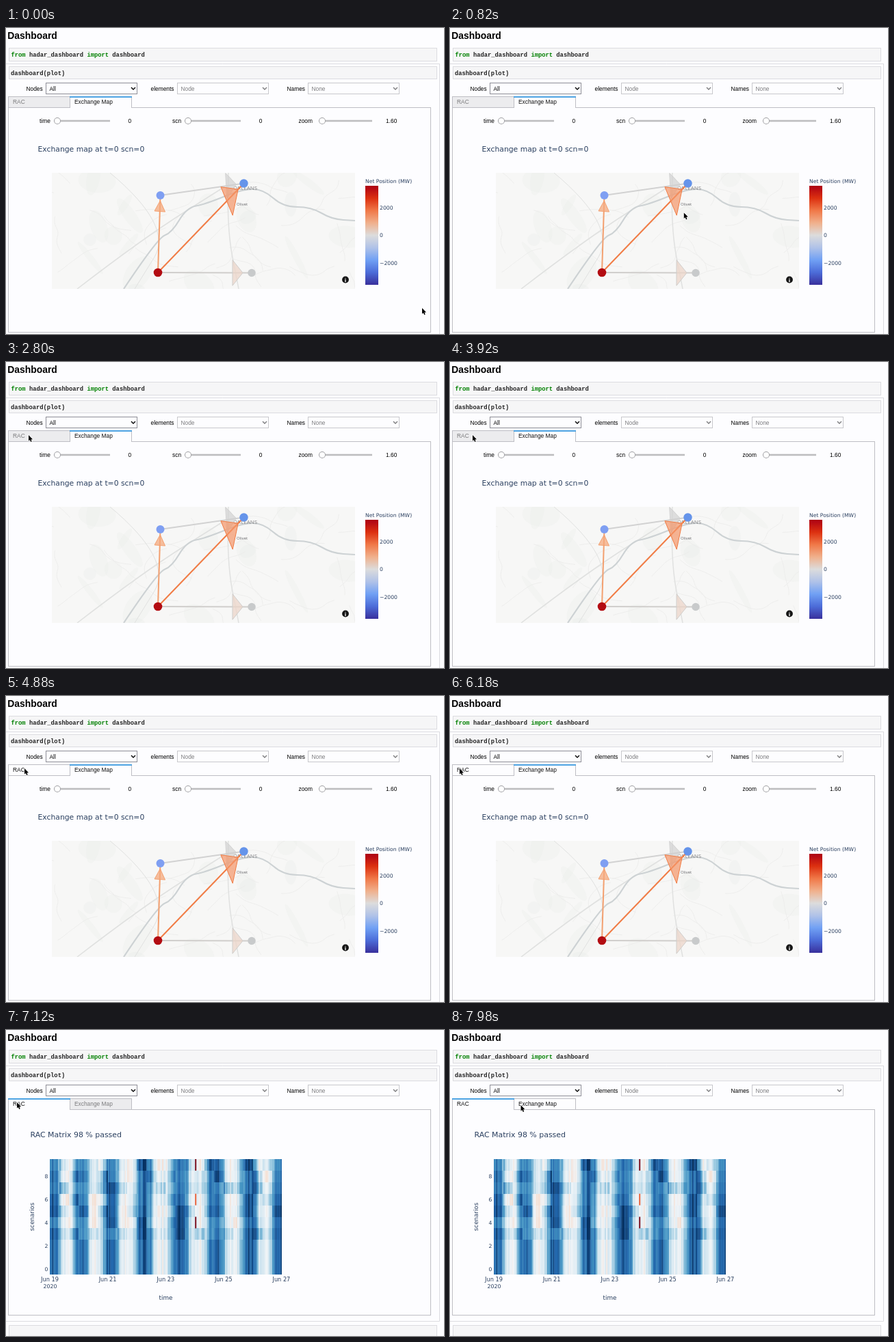
Write an HTML page with a canvas that moves like this. It is 640 by 448 pixels and loops after 8000 ms.

```html
<!DOCTYPE html>
<html lang="en">
<head>
<meta charset="utf-8">
<title>Dashboard</title>
<style>
html, body { margin: 0; width: 100%; height: 100%; overflow: hidden; background: #fdfdff; }
canvas { display: block; width: 640px; height: 448px; }
</style>
</head>
<body>
<canvas id="stage" width="640" height="448"></canvas>
<script>
const W = 640, H = 448, LOOP = 8000, SWITCH = 6400, HOVER = 4500;
const BG = '#fdfdff', PALE = '#f6f6f7', TAB = '#ececee', LINE = '#dcdce0', EDGE = '#bebec4';
const INK = '#000', GREY = '#7c7c7e', SOFT = '#2a3f5f';
const SANS = '"Liberation Sans", Arial, sans-serif';
const MONO = '"Liberation Mono", monospace';
const PLOT = '"DejaVu Sans", Verdana, sans-serif';
const stage = document.getElementById('stage').getContext('2d');

function rng(seed) {
  return () => {
    seed = (seed * 1664525 + 1013904223) >>> 0;
    return seed / 4294967296;
  };
}

function text(c, s, x, y, font, color = INK, align = 'left') {
  c.font = font;
  c.fillStyle = color;
  c.textAlign = align;
  c.fillText(s, x, y);
}
const label = (c, s, x, y, color) => text(c, s, x, y, '8.4px ' + SANS, color);
const plotText = (c, s, x, y, size, align) => text(c, s, x, y, size + 'px ' + PLOT, SOFT, align);

function box(c, x, y, w, h, fill, stroke) {
  c.fillStyle = fill;
  c.fillRect(x, y, w, h);
  c.strokeStyle = stroke;
  c.lineWidth = 1;
  c.strokeRect(x + 0.5, y + 0.5, w - 1, h - 1);
}

function path(c, pts, color, width) {
  c.beginPath();
  pts.forEach(([x, y]) => c.lineTo(x, y));
  c.strokeStyle = color;
  c.lineWidth = width;
  c.stroke();
}

// Smooth line through the midpoints of a few points.
function curve(c, pts, color, width) {
  c.beginPath();
  c.moveTo(...pts[0]);
  for (let i = 1; i < pts.length - 1; i++) {
    const [x, y] = pts[i], [nx, ny] = pts[i + 1];
    c.quadraticCurveTo(x, y, (x + nx) / 2, (y + ny) / 2);
  }
  c.lineTo(...pts[pts.length - 1]);
  c.strokeStyle = color;
  c.lineWidth = width;
  c.stroke();
}

function dot(c, x, y, r, color) {
  c.beginPath();
  c.arc(x, y, r, 0, 7);
  c.fillStyle = color;
  c.fill();
}

function layer(draw) {
  const cv = document.createElement('canvas');
  cv.width = W;
  cv.height = H;
  draw(cv.getContext('2d'));
  return cv;
}

function select(c, x, value, active) {
  const ink = active ? INK : GREY;
  box(c, x, 80, 134, 17, BG, active ? '#8e8e96' : '#c8c8cc');
  label(c, value, x + 5.5, 91.6, ink);
  path(c, [[x + 125, 87], [x + 128, 90], [x + 131, 87]], ink, 1.4);
}

function drawNotebook(c) {
  c.fillStyle = BG;
  c.fillRect(0, 0, W, H);
  text(c, 'Dashboard', 2.3, 16, 'bold 13.9px ' + SANS);
  const code = 'bold 8.8px ' + MONO, step = 5.28;
  box(c, 4, 29, 626, 20, PALE, LINE);
  let x = 7.5;
  for (const word of 'from hadar_dashboard import dashboard'.split(' ')) {
    const key = word === 'from' || word === 'import';
    text(c, word, x, 42, code, key ? '#008000' : '#222');
    x += (word.length + 1) * step;
  }
  box(c, 4, 56, 626, 19, PALE, LINE);
  text(c, 'dashboard(plot)', 7, 68.5, code, '#222');
  path(c, [[0, 52.5], [633.5, 52.5]], LINE, 1);

  label(c, 'Nodes', 29.5, 91.6);
  label(c, 'elements', 211.5, 91.6);
  label(c, 'Names', 410.5, 91.6);
  select(c, 58, 'All', true);
  select(c, 250, 'Node', false);
  select(c, 441, 'None', false);
}

function slider(c, name, x, handle, end, value, vx) {
  label(c, name, x, 139);
  c.fillStyle = '#bdbdbf';
  c.fillRect(handle - 5, 134.7, end - handle + 5, 2.6);
  dot(c, handle, 136, 4.9, '#a0a0a4');
  dot(c, handle, 136, 4, '#fff');
  label(c, value, vx, 139);
}

function drawTerrain(c) {
  const rand = rng(11), inMap = () => [67 + rand() * 443, 212 + rand() * 170];
  c.fillStyle = '#f7f7f6';
  c.fillRect(67, 212, 443, 170);
  for (let i = 0; i < 20; i++) {
    c.beginPath();
    c.ellipse(...inMap(), 8 + rand() * 28, 4 + rand() * 14, rand() * 3, 0, 7);
    c.fillStyle = 'rgba(232,235,232,.3)';
    c.fill();
  }
  for (let i = 0; i < 34; i++) {
    let [x, y] = inMap(), a = rand() * 6.3;
    const pts = [];
    for (let k = 0; k < 8; k++) {
      pts.push([x, y]);
      a += (rand() - 0.5) * 1.1;
      x += Math.cos(a) * 11;
      y += Math.sin(a) * 8;
    }
    curve(c, pts, '#ebebea', 0.8);
  }
  const road = '#e0e1e0';
  curve(c, [[104, 382], [200, 308], [320, 232]], road, 1.5);
  curve(c, [[152, 212], [245, 290], [188, 382]], road, 1);
  curve(c, [[325, 212], [322, 290], [340, 382]], road, 1.5);
  curve(c, [[172, 382], [222, 307], [242, 300], [264, 263], [291, 258], [345, 236], [376, 236],
    [405, 262], [446, 262], [476, 280], [510, 282]], '#cdd2d4', 2.2);
}

// Line between two nodes; the head is stretched with the map and ends a gap before the node.
function arrow(c, from, to, color, fill, size = 15, gap = 11) {
  const dx = to[0] - from[0], dy = to[1] - from[1], len = Math.hypot(dx, dy);
  const ux = dx / len, uy = dy / len;
  const tip = [to[0] - ux * gap, to[1] - uy * gap];
  const base = [tip[0] - ux * size, tip[1] - uy * size];
  const side = [-uy * size * 0.5, ux * size * 1.25];
  path(c, [from, to], color, 2);
  c.beginPath();
  c.moveTo(...tip);
  c.lineTo(base[0] + side[0], base[1] + side[1]);
  c.lineTo(base[0] - side[0], base[1] - side[1]);
  c.closePath();
  c.fillStyle = fill;
  c.fill();
  c.strokeStyle = color;
  c.lineWidth = 1;
  c.stroke();
}

function drawMap(c) {
  slider(c, 'time', 49, 75, 152, '0', 178.5);
  slider(c, 'scn', 243, 266, 343, '0', 369.8);
  slider(c, 'zoom', 427.5, 462, 535, '1.60', 555);
  plotText(c, 'Exchange map at t=0 scn=0', 46.5, 181, 10.8);

  c.save();
  c.beginPath();
  c.rect(67, 212, 443, 170);
  c.clip();
  drawTerrain(c);
  text(c, 'ORLEANS', 332, 237, '8px "Open Sans", sans-serif', '#838386');
  text(c, 'Olivet', 337, 259.5, '6px "Open Sans", sans-serif', '#6c6c70');

  const red = [222, 358], west = [225.5, 245], north = [347.5, 227.5], east = [359, 358.5];
  arrow(c, west, north, '#d2d2d2', 'rgba(208,208,208,.65)');
  arrow(c, red, east, '#d0cecc', 'rgba(236,214,202,.75)', 15, 13);
  arrow(c, red, west, '#f3a070', 'rgba(246,170,126,.75)', 15.5, 8);
  arrow(c, red, north, '#f17c45', 'rgba(246,150,104,.7)', 24, 12);
  dot(c, ...west, 6, '#7f9ff2');
  dot(c, ...north, 6.2, '#6594ea');
  dot(c, ...east, 5.7, '#c8cacb');
  dot(c, ...red, 6.3, '#b30c12');
  dot(c, 496, 368.5, 4.9, '#161616');
  text(c, 'i', 496, 371.6, 'bold 8.5px "Liberation Serif", serif', '#fff', 'center');
  c.restore();

  plotText(c, 'Net Position (MW)', 525, 227, 7.65);
  const bar = c.createLinearGradient(0, 231, 0, 376);
  ['#ac0014', '#dc3010', '#f07848', '#f0b08c', '#dcdcdc', '#b0c2e8', '#70a0f4', '#4c6cd8', '#39309c']
    .forEach((color, i) => bar.addColorStop(i / 8, color));
  c.fillStyle = bar;
  c.fillRect(525, 231, 19, 145);
  ['2000', '0', '\u22122000'].forEach((s, i) => plotText(c, s, 546, 265.5 + i * 40.7, 7.7));
}

const RAMP = [[246, 220, 205], [240, 244, 247], [209, 229, 240], [146, 197, 222], [67, 147, 195], [33, 102, 172], [5, 48, 97]];

function shade(v) {
  const p = Math.min(0.999, Math.max(0, v)) * (RAMP.length - 1), i = Math.floor(p);
  return `rgb(${RAMP[i].map((n, k) => Math.round(n + (RAMP[i + 1][k] - n) * (p - i)))})`;
}

// Daily wave, slightly early in the first half and late in the second.
function wave(x) {
  const drift = 8 * Math.sin(2 * Math.PI * x / 390);
  return Math.tanh(1.5 * Math.cos(2 * Math.PI * (x - 4 + drift) / 46.4));
}

function drawMatrix(c) {
  plotText(c, 'RAC Matrix 98 % passed', 35.5, 157.3, 10.95);
  const rand = rng(5), cols = 192, cw = 339 / cols, rh = 16.9, patch = [];
  for (let i = 0; i < cols; i++) {
    const stripe = (rand() - 0.5) * 0.22;
    for (let r = 0; r < 10; r++) {
      if (i % 8 === 0) patch[r] = r < 3 ? 0 : (rand() - 0.55) * 0.26;
      // Every fourth scenario is flatter and a little deeper.
      const flat = r % 4 === 3, swing = flat ? 0.3 : 0.37;
      c.fillStyle = shade(0.53 + (flat ? 0.06 : 0) + swing * wave(i * cw) + stripe + patch[r]);
      const top = Math.round(358 - (r + 1) * rh), bottom = Math.round(358 - r * rh);
      c.fillRect(64 + i * cw, top, Math.min(cw + 0.4, 339 - i * cw), bottom - top);
    }
  }
  for (const r of [4, 6, 9]) {
    c.fillStyle = r === 6 ? '#e8643c' : '#7a1020';
    c.fillRect(276.2, 358 - (r + 1) * rh, 2, rh);
  }
  for (let r = 0; r < 10; r += 2) plotText(c, String(r), 61.5, 352.5 - r * rh, 7.7, 'right');
  for (let d = 0; d <= 8; d += 2) plotText(c, 'Jun ' + (19 + d), 64 + d * 42.3, 368, 8.2, 'center');
  plotText(c, '2020', 64.5, 378, 7.8, 'center');
  plotText(c, 'time', 233.5, 395, 8.8, 'center');
  c.save();
  c.translate(41.3, 273.5);
  c.rotate(-Math.PI / 2);
  plotText(c, 'scenarios', 0, 0, 8.7, 'center');
  c.restore();
}

function drawFrame(c, bottom) {
  c.strokeStyle = EDGE;
  c.lineWidth = 1;
  c.strokeRect(3.5, 116.5, 617, bottom - 116.5);
}

const mapView = layer(c => {
  drawNotebook(c);
  path(c, [[633.5, 52], [633.5, H]], LINE, 1);
  drawFrame(c, 445.5);
  drawMap(c);
});

const matrixView = layer(c => {
  drawNotebook(c);
  path(c, [[633.5, 52], [633.5, 426.5], [0, 426.5]], LINE, 1);
  box(c, 4, 432, 626, 20, PALE, LINE);
  drawFrame(c, 417.5);
  drawMatrix(c);
});

function tab(c, name, x, active, hover) {
  box(c, x, 100, 91, 17, active || hover ? BG : TAB, EDGE);
  if (active) {
    c.fillStyle = BG;
    c.fillRect(x + 1, 115, 89, 3);
    c.fillStyle = '#3c9be0';
    c.fillRect(x, 100, 91, 1.8);
  }
  label(c, name, x + 7, 111, active || hover ? '#111' : GREY);
}

// Pointer moves: start, duration, end point.
const START = [608, 410];
const MOVES = [
  [250, 1200, [34, 109]], [2400, 400, [33, 107]], [4200, 650, [27, 106]],
  [5100, 700, [14, 106]], [6500, 550, [16, 106]], [7520, 420, [103.5, 110]]
];

function pointerAt(t) {
  return MOVES.reduce(([x, y], [start, time, [nx, ny]]) => {
    const p = Math.min(1, Math.max(0, (t - start) / time)), e = p * p * (3 - 2 * p);
    return [x + (nx - x) * e, y + (ny - y) * e];
  }, START);
}

const POINTER = new Path2D('M0 0v8.6l1.9-1.7 1.3 3.1 1.5-.7-1.3-2.9 2.6-.2z');

function drawPointer(c, x, y) {
  c.save();
  c.translate(x, y);
  c.lineJoin = 'round';
  c.strokeStyle = '#fff';
  c.lineWidth = 1.4;
  c.stroke(POINTER);
  c.fillStyle = '#000';
  c.fill(POINTER);
  c.restore();
}

function draw(t) {
  const matrix = t >= SWITCH, [x, y] = pointerAt(t);
  stage.drawImage(matrix ? matrixView : mapView, 0, 0);
  const tabs = [['RAC', 3, matrix, t >= HOVER], ['Exchange Map', 93, !matrix, t > SWITCH && x >= 93]];
  if (matrix) tabs.reverse();
  tabs.forEach(args => tab(stage, ...args));
  drawPointer(stage, x, y);
}

function tick() {
  draw(performance.now() % LOOP);
  requestAnimationFrame(tick);
}
tick();
</script>
</body>
</html>
```
